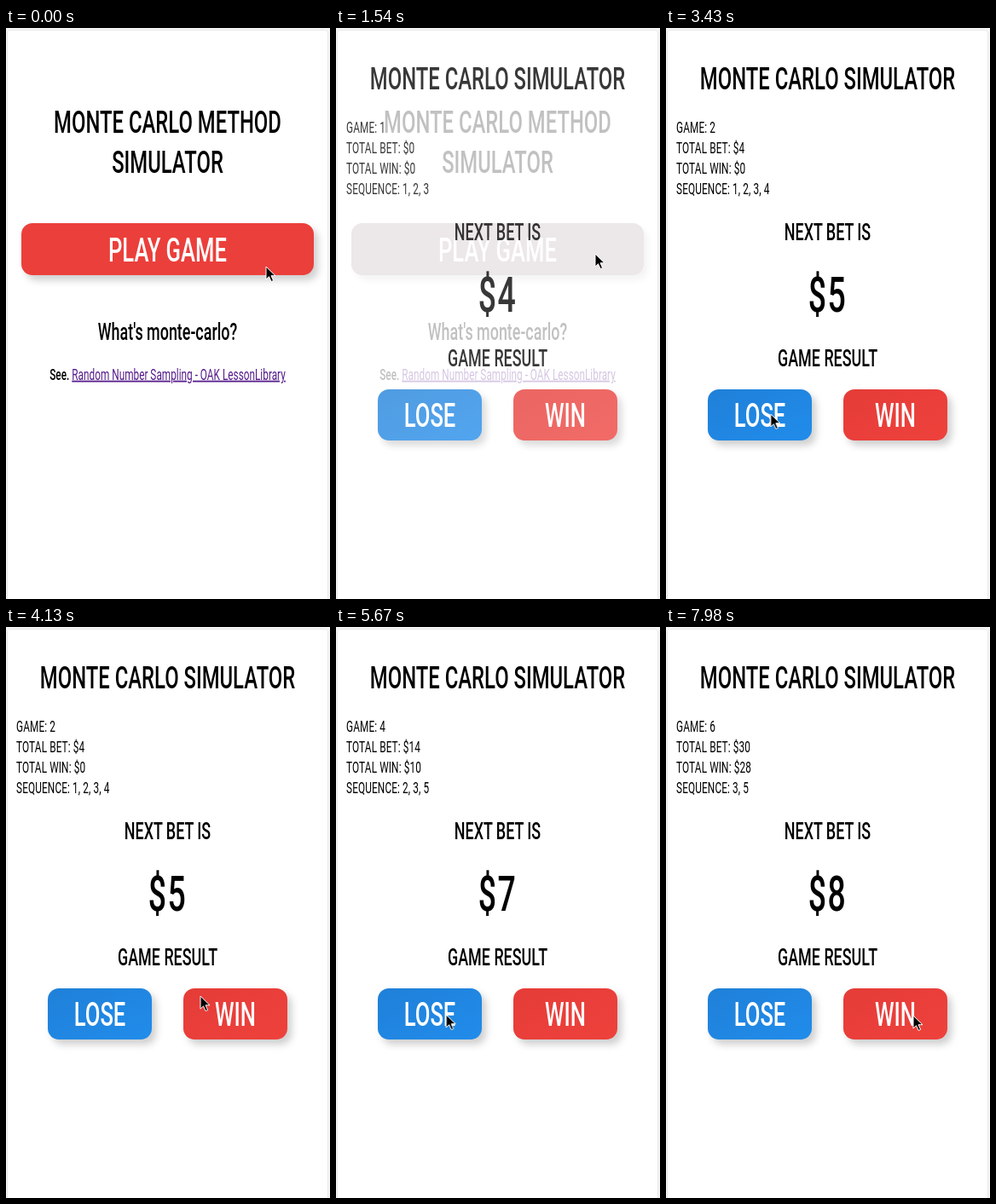
An HTML page for the animation above (8 s loop, 380 px wide and 670 px high).

```html
<!DOCTYPE html>
<html lang="en">
<head>
<meta charset="utf-8">
<title>Monte Carlo Simulator</title>
<style>
  html, body { margin: 0; width: 100%; height: 100%; overflow: hidden; background: #f6f6f6; }
  svg { display: block; width: 380px; height: 670px; }

  /* One condensed text face for the whole app, placed by baseline. */
  text {
    font: 500 18px Roboto, "Open Sans", sans-serif;
    text-anchor: middle;
    white-space: pre;
    transform: translate(var(--x, 189.5px), var(--y)) scaleX(.657);
  }
  .title { font-size: 36.3px; }
  .heading { font-size: 27.3px; }
  .bet { font-size: 57px; letter-spacing: .04em; }
  .stat { --x: 12px; text-anchor: start; font-weight: 400; letter-spacing: .01em; }
  .link { fill: #551a8b; text-decoration: underline; font-weight: 400; }
  .caption { font-size: 39px; fill: #fff; }
  .button { filter: drop-shadow(5px 6px 4px rgba(0, 0, 0, .19)); }

  #home, #game, #play, #cursor { animation: 8s linear infinite; }
  #home { animation-name: leave; }
  #game { animation-name: enter; }
  #play { animation-name: press; }
  #cursor { animation-name: point; }

  @keyframes leave { 0%, 16.25% { opacity: 1 } 20.25%, 100% { opacity: 0 } }
  @keyframes enter { 0%, 16.25% { opacity: 0 } 20.1%, 100% { opacity: 1 } }
  @keyframes press {
    0%, 16.25% { fill: #eb3f3b }
    16.26%, 100% { fill: #af9ba3 }
  }
  @keyframes point {
    0% { transform: translate(305px, 280px) }
    11% { transform: translate(304px, 266px) }
    19.25% { transform: translate(304px, 265px) }
    24% { transform: translate(294px, 275px) }
    32.375% { transform: translate(196px, 356px) }
    38% { transform: translate(112px, 452px) }
    42% { transform: translate(112px, 455px) }
    51.625% { transform: translate(228px, 433px) }
    55%, 60.375% { transform: translate(240px, 451px) }
    66% { transform: translate(128px, 455px) }
    74% { transform: translate(130px, 455px) }
    79% { transform: translate(255px, 454px) }
    82.25% { transform: translate(268px, 454px) }
    90% { transform: translate(280px, 455px) }
    99.75%, 100% { transform: translate(290px, 456px) }
  }
</style>
</head>
<body>
<svg viewBox="0 0 380 670">
  <defs>
    <linearGradient id="blue" x2="1" y2="1">
      <stop stop-color="#1f80d8"/><stop offset="1" stop-color="#218ceb"/>
    </linearGradient>
    <linearGradient id="red" x2="1" y2="1">
      <stop stop-color="#e53c38"/><stop offset="1" stop-color="#ee413c"/>
    </linearGradient>
  </defs>

  <rect x="1.5" y="2.5" width="376" height="680" rx="3" fill="#fff" stroke="#e9e9e9"/>

  <g id="home">
    <text class="title" style="--y:122.5px">MONTE CARLO METHOD</text>
    <text class="title" style="--y:170px">SIMULATOR</text>
    <g class="button">
      <rect id="play" x="18" y="229" width="343" height="61" rx="13"/>
      <text class="caption" style="--y:273.5px">PLAY GAME</text>
    </g>
    <text class="heading" style="--y:366px">What's monte-carlo?</text>
    <text style="--y:412.5px">See. <tspan class="link">Random Number Sampling - OAK LessonLibrary</tspan></text>
  </g>

  <g id="game">
    <text class="title" style="--y:71.5px">MONTE CARLO SIMULATOR</text>
    <text class="stat" style="--y:122.5px"></text>
    <text class="stat" style="--y:146.5px"></text>
    <text class="stat" style="--y:170.5px"></text>
    <text class="stat" style="--y:194.5px"></text>
    <text class="heading" style="--y:249px">NEXT BET IS</text>
    <text class="bet" style="--y:333px"></text>
    <text class="heading" style="--y:396.5px">GAME RESULT</text>
    <g class="button">
      <rect x="49" y="424" width="122" height="60" rx="13" fill="url(#blue)"/>
      <text class="caption" style="--x:110px;--y:468px">LOSE</text>
    </g>
    <g class="button">
      <rect x="208" y="424" width="122" height="60" rx="13" fill="url(#red)"/>
      <text class="caption" style="--x:269px;--y:468px">WIN</text>
    </g>
  </g>

  <path id="cursor" d="M0 0V15l3.5-3.3 2.6 5.8 2.5-1.1-2.6-5.7h5z" stroke="#fff" stroke-linejoin="round"/>
</svg>
<script>
  const LOOP = 8000;
  const clicks = [
    { at: 3300, won: false },
    { at: 4500, won: true },
    { at: 5450, won: false },
    { at: 5900, won: false },
    { at: 6900, won: true },
  ];
  const stats = document.querySelectorAll('.stat');
  const betLabel = document.querySelector('.bet');

  const nextBet = sequence => sequence[0] + sequence.at(-1);

  // A win pays double and drops both ends; a loss appends the stake.
  function play({ game, bet, win, sequence }, won) {
    const stake = nextBet(sequence);
    return {
      game: game + 1,
      bet: bet + stake,
      win: win + (won ? 2 * stake : 0),
      sequence: won ? sequence.slice(1, -1) : [...sequence, stake],
    };
  }

  const rounds = [{ game: 1, bet: 0, win: 0, sequence: [1, 2, 3] }];
  for (const { won } of clicks) rounds.push(play(rounds.at(-1), won));

  function show({ game, bet, win, sequence }) {
    const lines = [
      `GAME: ${game}`,
      `TOTAL BET: $${bet}`,
      `TOTAL WIN: $${win}`,
      `SEQUENCE: ${sequence.join(', ')}`,
    ];
    stats.forEach((label, i) => label.textContent = lines[i]);
    betLabel.textContent = `$${nextBet(sequence)}`;
  }

  let start, shown;
  function tick(now) {
    start ??= now;
    const time = (now - start) % LOOP;
    const round = rounds[clicks.filter(click => click.at <= time).length];
    if (round !== shown) show(shown = round);
    requestAnimationFrame(tick);
  }
  show(shown = rounds[0]);
  requestAnimationFrame(tick);
</script>
</body>
</html>
```
